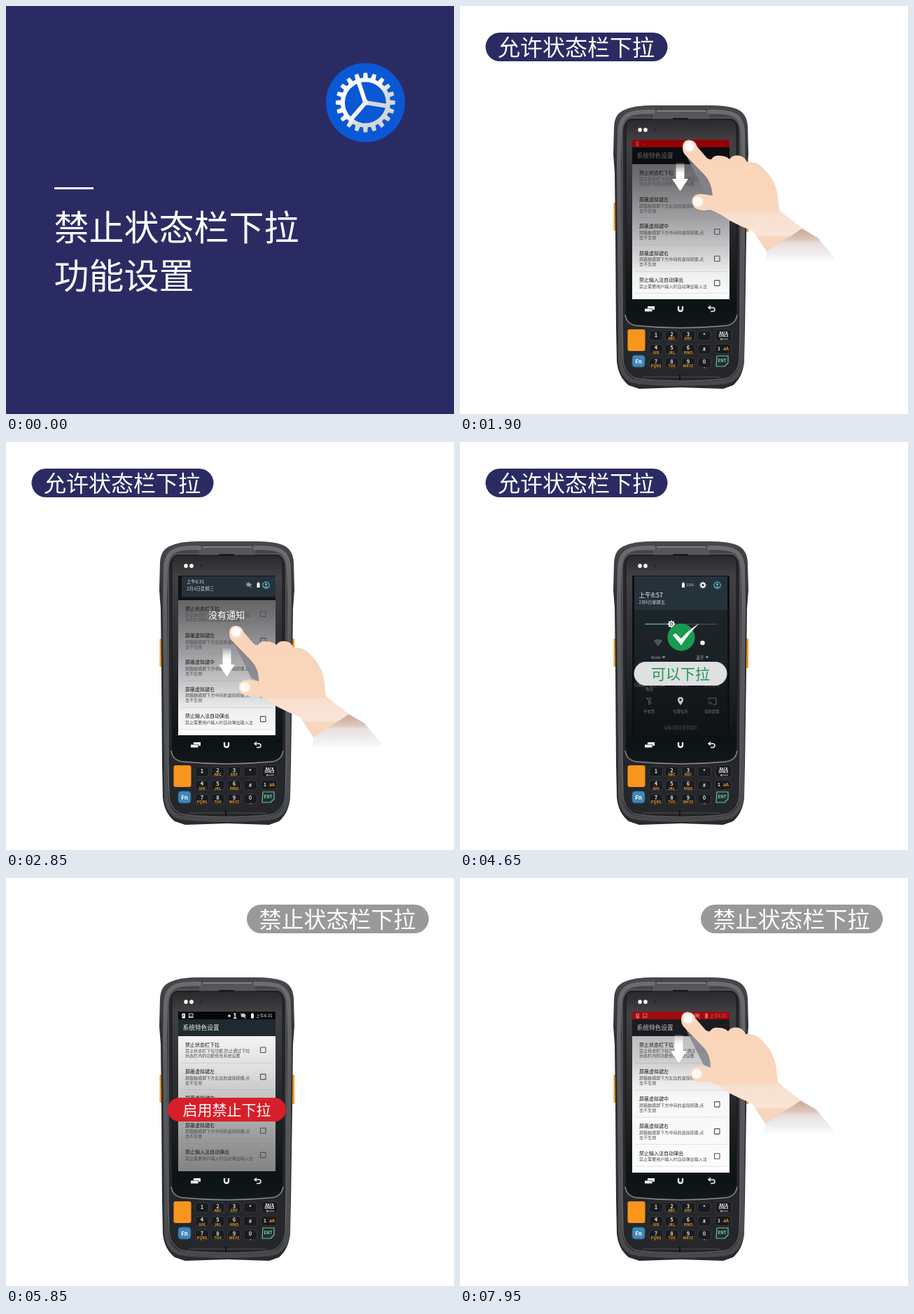
Write an HTML page that moves like this. It is 640x583 px and loops after 8 s.

```html
<!DOCTYPE html>
<html lang="zh">
<head>
<meta charset="utf-8">
<style>
html, body { margin: 0; width: 100%; height: 100%; overflow: hidden; background: #fff; }
svg { display: block; width: 100vw; height: 100vh; }
text { font-family: 'Noto Sans CJK SC', 'Noto Sans CJK', 'Noto Sans', sans-serif; }
</style>
</head>
<body>
<svg id="stage" viewBox="0 0 640 583"></svg>
<script>
const NAVY = '#2b2b64';

// Building blocks; text is placed by its vertical centre.
const rect = (x, y, w, h, fill, r = 0, more = '') =>
  `<rect x="${x}" y="${y}" width="${w}" height="${h}" rx="${r}" fill="${fill}" ${more}/>`;
const circle = (x, y, r, fill, more = '') =>
  `<circle cx="${x}" cy="${y}" r="${r}" fill="${fill}" ${more}/>`;
const path = (d, fill, more = '') => `<path d="${d}" fill="${fill}" ${more}/>`;
const line = (d, color, width, more = '') =>
  path(d, 'none', `stroke="${color}" stroke-width="${width}" ${more}`);
const text = (x, y, size, str, fill, weight = 400, anchor = 'start') =>
  `<text x="${x}" y="${y + size * 0.38}" font-size="${size}" fill="${fill}" font-weight="${weight}" text-anchor="${anchor}">${str}</text>`;
const group = (id, body) => `<g id="${id}">${body}</g>`;
const gradient = (id, stops, dir = 'x2="0" y2="1"') =>
  `<linearGradient id="${id}" x1="0" y1="0" ${dir}>` +
  stops.map(([o, c, a = 1]) => `<stop offset="${o}" stop-color="${c}" stop-opacity="${a}"/>`).join('') +
  '</linearGradient>';

const defs = '<defs>' +
  gradient('gearFill', [[0, '#fff'], [0.45, '#fafafa'], [0.6, '#d9dade'], [1, '#d0d1d6']], 'x2="1" y2="1"') +
  gradient('shell', [[0, '#48494d'], [0.2, '#303135'], [1, '#2a2b2f']]) +
  gradient('rim', [[0, '#6c6d71'], [0.3, '#5c5d61'], [0.75, '#505155'], [1, '#48494d']]) +
  gradient('glass', [[0, '#29292c'], [0.1, '#414144'], [0.35, '#333336'], [0.7, '#1b1e21'], [0.9, '#0c1315'], [1, '#12181a']]) +
  gradient('dimTop', [[0, '#656467'], [0.12, '#747376'], [0.4, '#a09fa1'], [0.62, '#c8c7c9'], [0.82, '#f0f0f0'], [1, '#fbfbfb']]) +
  gradient('dimBottom', [[0, '#f3f3f3'], [0.25, '#dededf'], [0.5, '#bcbcbd'], [0.75, '#9b9b9c'], [1, '#838384']]) +
  gradient('dimFirst', [[0, '#bdbdbf'], [0.2, '#d0d0d1'], [0.28, '#e3e3e4'], [0.45, '#f7f7f7'], [1, '#fcfcfc']]) +
  gradient('quickFill', [[0, '#1f272a'], [0.5, '#1b2225'], [0.7, '#14191b'], [1, '#0f1315']]) +
  gradient('cuff', [[0, '#c9a594'], [0.35, '#dcc6bc'], [0.45, '#e8dedb'], [0.75, '#ededee'], [1, '#f8f8f8', 0.7]]) +
  gradient('skin', [[0, '#f9d4b8'], [0.64, '#f9d6bc'], [0.66, '#f8e0d0'], [0.85, '#f9e4d7'], [0.87, '#f7d5bb'], [1, '#f6d6bf']]) +
  gradient('arrow', [[0, '#fff', 0.15], [0.35, '#fff', 0.75], [0.6, '#fff'], [1, '#fff']]) +
  '</defs>';

function gear(cx, cy, teeth, root, tip, hole, fill) {
  const at = (r, a) => `${(cx + r * Math.cos(a)).toFixed(2)},${(cy + r * Math.sin(a)).toFixed(2)}`;
  const step = 2 * Math.PI / teeth;
  const points = [];
  for (let i = 0; i < teeth; i++) {
    const a = i * step - Math.PI / 2;
    points.push(at(root, a - step * 0.31), at(tip, a - step * 0.2), at(tip, a + step * 0.2), at(root, a + step * 0.31));
  }
  const inner = `M${cx - hole},${cy}a${hole},${hole} 0 1 0 ${2 * hole},0a${hole},${hole} 0 1 0 ${-2 * hole},0`;
  return path(`M${points.join('L')}Z${inner}Z`, fill, 'fill-rule="evenodd"');
}

const title = rect(0, 0, 640, 583, NAVY) +
  circle(513.5, 138, 56.5, '#0a58d5') +
  gear(513.5, 138, 20, 35.5, 42.5, 29.5, 'url(#gearFill)') +
  line('M513.5 138L503.5 108', '#fff', 6) +
  line('M513.5 138L545 143', '#d6d7dc', 6) +
  line('M513.5 138L491 164', '#f4f4f6', 6) +
  circle(513.5, 138, 4, '#eeeef1') +
  rect(69, 259, 56, 3, '#fff') +
  text(68.5, 316, 50, '禁止状态栏下拉', '#fff', 500) +
  text(68.5, 385, 50, '功能设置', '#fff', 500);

const label = (x, str, fill) =>
  rect(x, 38, 260, 41, fill, 20.5) + text(x + 17.5, 59, 32, str, '#fff');

function keypad() {
  const cols = [280, 302.5, 326, 349], rows = [471, 490.5, 510];
  const letters = [['1', ''], ['2', 'ABC'], ['3', 'DEF'], ['*', ''], ['4', 'GHI'], ['5', 'JKL'], ['6', 'MNO'],
    ['#', ''], ['7', 'PQRS'], ['8', 'TUV'], ['9', 'WXYZ'], ['0', '⎵']];
  const key = (x, y, w, h) => rect(x, y, w, h, '#1a1b1e', 4, 'stroke="#3a3b3f" stroke-width="1"');
  let out = '';
  letters.forEach(([digit, sub], i) => {
    const x = cols[i % 4], y = rows[i >> 2];
    out += key(x - 9.5, y - 7, 19, 14) +
      text(x, y - (sub ? 2 : 0.5), 7.5, digit, '#e0e0e0', 700, 'middle') +
      text(x, y + 4.3, 5.4, sub, '#e79a28', 700, 'middle');
  });
  return out +
    rect(239.5, 462, 25, 31, '#f8951d', 3) +
    rect(246, 499, 18, 17, '#4088b9', 4, 'stroke="#28597c" stroke-width="1"') +
    text(255, 507.5, 8, 'Fn', '#fff', 700, 'middle') +
    key(365, 462, 23, 17) +
    text(376.5, 467, 4.6, 'BACK', '#fff', 700, 'middle') +
    text(376.5, 471.5, 4.6, 'SPACE', '#fff', 700, 'middle') +
    line('M372 476H383M374 474.5L372 476L374 477.5', '#ddd', 0.8) +
    key(364, 483, 23, 14) + text(368, 490, 6.5, '1', '#eee', 700) +
    text(376, 490, 6.5, 'aA', '#e79a28', 700) +
    path('M367 500H383V510L378 515H366Z', '#1c3230', 'stroke="#79b8a3" stroke-width="1.2" stroke-linejoin="round"') +
    text(374.5, 507, 6, 'ENT', '#8fd0b4', 700, 'middle');
}

const phone =
  rect(219.5, 281, 4, 40, '#f0a02c', 1) + rect(407, 281, 5, 42, '#f39a1c', 1) +
  // rubber shell
  path('M236 148Q250 142 276 142H357Q382 142 395 147Q410 153 411 172L412 212L410 238L409 330L407 460L406 508Q404 530 390 542L376 547L316 545L256 547L241 542Q226 530 224 508L223 460L222 330L221 238L219 212L220 172Q221 153 236 148Z', 'url(#shell)') +
  // metal frame
  line('M242 155Q250 151 276 151L282 158H350L356 151Q382 151 390 155Q403 160 404 180L405 225L403 460V506Q401 527 386 535Q375 539 316 540Q256 539 245 535Q230 527 229 506V460L227 225L228 180Q229 160 242 155Z', 'url(#rim)', 6) +
  path('M243 160H389Q400 165 400 180V460L399 506Q398 522 384 531Q372 535 316 536Q260 535 248 531Q234 522 233 506L232 460V180Q232 165 243 160Z', '#26272a', 'stroke="#797a7e" stroke-width=".9"') +
  path('M282 149H350L356 155V162H276V155Z', '#55565a') + line('M281 150H351', '#8b8c90', 1.3) +
  rect(304, 160, 22, 3, '#17181a', 1) +
  path('M248 162H384Q395 162 395 174V440Q394 453 378 455Q316 461 253 455Q237 453 237 440V174Q237 162 248 162Z', 'url(#glass)', 'stroke="#18191b"') +
  line('M236 441Q238 456 254 457Q316 463 378 457Q394 456 396 441', '#85868b', 1.5) +
  circle(257, 177, 2.9, '#f4f4f4') + circle(265, 177, 2.9, '#f4f4f4') + rect(277, 175, 4, 4, '#22235d') +
  path('M268 429H278V434H275V432H268Z', '#f2f2f2') + rect(264, 432.5, 10.5, 4, '#f2f2f2') +
  line('M312 429V433Q312 436 315 436Q318 436 318 433V429', '#f2f2f2', 2.3) +
  line('M356 431H361Q364 431 364 433.8Q364 436.5 361 436.5H358M358 428.5L355 431L358 433.5', '#f2f2f2', 1.5) +
  keypad() + line('M256 541L262 530H312L314 532L316 530H370L376 541', '#4e4f53', 1) + rect(313, 527, 2, 7, '#0e0e10');

const entries = [
  ['禁止状态栏下拉', '禁止状态栏下拉功能,防止通过下拉', '状态栏内的功能修改系统设置'],
  ['屏蔽虚拟键左', '屏蔽触摸屏下方左边的虚拟按键,点', '击不生效'],
  ['屏蔽虚拟键中', '屏蔽触摸屏下方中间的虚拟按键,点', '击不生效'],
  ['屏蔽虚拟键右', '屏蔽触摸屏下方中间的虚拟按键,点', '击不生效'],
  ['禁止输入法自动弹出', '禁止需要用户输入时自动弹出输入法', '']
];

function settings({ bar, head, headText, list, pitch = 38.4, bottom = 419, checked }) {
  let out = rect(246, 191, 139, 11.5, bar) + rect(246, 202, 139, 24, head) +
    text(252.5, 214, 8.7, '系统特色设置', headText) + rect(246, 226, 139, bottom - 226, list);
  entries.forEach(([name, first, second], i) => {
    const y = 238 + i * pitch, box = y + (i === 4 ? 4 : 7.5);
    out += text(256, y, 7, name, '#151515', 500) +
      text(256, y + 9, 6.05, first, '#4c4c4e') + text(256, y + 16, 6.05, second, '#4c4c4e') +
      rect(363.5, box - 3.5, 7.5, 7.5, 'none', 0.5, 'stroke="#4f4f51" stroke-width="1.1"') +
      rect(250, y + (i === 4 ? 18.5 : 26), 131, 0.6, '#777', 0, 'opacity=".3"');
    if (checked && !i) out += line(`M365 ${box}l2 2l4 -5`, '#00897b', 1.3);
  });
  return out;
}

const battery = (x, y, fill) => rect(x - 2, y - 3, 4, 6.5, fill, 0.5) + rect(x - 1, y - 4, 2, 1.2, fill);
const muted = (x, y, fill) =>
  path(`M${x - 3} ${y + 2}Q${x - 3} ${y - 4} ${x} ${y - 4}Q${x + 3} ${y - 4} ${x + 3} ${y + 2}Z`, fill, 'opacity=".7"') +
  line(`M${x - 4} ${y - 4}L${x + 4} ${y + 4}M${x - 4} ${y - 1}H${x + 4}`, fill, 0.9);
const person = (x, y) => circle(x, y, 4.6, 'none', 'stroke="#63b6c6" stroke-width="1.3"') +
  circle(x, y - 1.3, 1.6, '#63b6c6') + path(`M${x - 3} ${y + 3}Q${x} ${y - 0.5} ${x + 3} ${y + 3}Z`, '#63b6c6');

const statusIcons = color =>
  rect(251.5, 193.5, 4.5, 7, color, 0.7) + line('M253.8 195V198', '#222', 0.9) +
  rect(261.5, 194, 5.5, 5.5, 'none', 0, `stroke="${color}" stroke-width=".9"`) + line('M262 199L264 197L266.5 199', color, 1) +
  circle(319, 197, 1.8, color) + text(327, 197, 10.5, '1', color, 700, 'middle') +
  muted(339, 197, color) + battery(352, 197, color) + text(357, 197, 6, '上午6:31', color);

const redDim = settings({ bar: '#920208', head: '#0c0d10', headText: '#69696b', list: 'url(#dimTop)' }) +
  rect(252, 194, 2.5, 6, 'none', 0, 'stroke="#d16a6a" stroke-width=".8"') +
  circle(263, 198, 0.7, '#c55') + line('M326.5 194H328.5V200H326.5', '#c86464', 0.8);

const shade = rect(246, 191, 139, 35, '#101315') + rect(251, 192, 134, 29.5, '#26323a') +
  text(258, 200, 6.4, '上午6:31', '#e6e9ea') + text(258, 209.5, 6.4, '2月4日星期三', '#ccd2d4') +
  muted(347, 204.5, '#a7afb2') + battery(360.5, 204.5, '#fff') + person(371.5, 204.5) +
  text(315, 247, 13, '没有通知', '#fff', 500, 'middle');

const tile = (x, str) => text(x, 385, 5.3, str, '#6c7376', 400, 'middle');
const caret = x => path(`M${x} 306.5h5l-2.5 2.8z`, '#a7adaf');
const quick = rect(246, 191, 139, 231, '#0b1012') + rect(249, 192, 133, 228, 'url(#quickFill)') + rect(249, 192, 133, 48, '#26323a') +
  battery(319, 204.5, '#fff') + text(323.5, 204.5, 5.2, '11%', '#e5e8e9') +
  gear(347, 204.5, 8, 3.5, 4.7, 1.7, '#fff') + person(367.5, 204.5) +
  text(255.5, 218.5, 8.7, '上午8:57', '#f0f2f2') + text(255.5, 229, 6.1, '2月6日星期五', '#d5dadb') +
  rect(264, 259.5, 38, 1.4, '#58aea4') + rect(302, 259.8, 65, 0.9, '#586064') +
  gear(302, 260.2, 8, 4, 5.3, 2.4, '#fff') + circle(302, 260.2, 1.4, '#fff') +
  path('M276.5 284Q283 279.5 289.5 284L283 292Z', '#4f5659') + circle(346.5, 287, 3.3, '#eef0f0') +
  text(273, 308, 5, 'WLAN', '#a7adaf') + caret(288.5) + text(337.5, 308, 5.4, '蓝牙', '#a7adaf') + caret(350.5) +
  rect(254, 314, 123, 0.6, '#384246') +
  text(270.5, 347, 5.5, '只能拨打紧急呼救', '#757b7d', 400, 'middle') + text(270.5, 353, 5.5, '电话', '#757b7d', 400, 'middle') +
  text(315, 347, 5.5, '飞行模式', '#555c5f', 400, 'middle') + text(360, 347, 5.5, '自动旋转', '#555c5f', 400, 'middle') +
  line('M267.5 366H273.5L271.5 369V375H269.5V369ZM265.5 365L274.5 374', '#5d6467', 0.9) +
  path('M315 376Q311 371 311 368.5A4 4 0 0 1 319 368.5Q319 371 315 376ZM315 367a1.5 1.5 0 1 0 .01 0Z', '#c3c8ca', 'fill-rule="evenodd"') +
  line('M355 368V366H366V375H361M355 370.5Q359 371 359.5 375M355 373Q357 373.5 357.2 375', '#5d6467', 1) +
  tile(270, '手电筒') + tile(315, '位置信息') + tile(360, '投射屏幕') +
  text(315, 408, 5.3, '设备可能会受到监控', '#4c5457', 400, 'middle');

const pill = (x, w, str, fill, color, weight) =>
  rect(x, 314, w, 34, fill, 17) + text(x + w / 2, 331, 21, str, color, weight, 'middle');
const allowed = circle(316, 279, 19.5, '#189b50') +
  path('M304 276L308 273.5L316 281Q327 268 342 259Q328 272 316 290.5Z', '#fff') +
  pill(248.5, 133, '可以下拉', '#dfe0e1', '#219653', 400);

const arrow = rect(309.5, 295, 12, 26, 'url(#arrow)') + path('M304 318H327L315.5 335.5Z', '#fff');
const hand =
  path('M321 278L351 338L361 342L359 314Z', '#86838a', 'opacity=".85"') +
  path('M437 436L440 420L488 388L512 402L538 433L528 436Z', 'url(#cuff)') +
  path('M319 273C319 264 326 260 333 264L351 285Q355 291 360 290Q364 284 372 285Q381 285 386 290Q391 283 401 285Q408 287 411 294Q425 292 435 304Q453 321 455 345L457 363L490 389L439 422L420 393Q402 386 387 378Q372 367 358 362Q346 365 337 360Q331 354 333 346Q337 338 349 340L362 342Q360 322 350 312L322 283Q319 279 319 273Z', 'url(#skin)') +
  circle(330, 272, 9, '#f5ddcd') + circle(328.5, 271.5, 7, '#fffaf6') +
  circle(342, 350.5, 9, '#f5dccb') + circle(341, 350.5, 7, '#fff8f3');

const calm = { head: '#1f2a2e', headText: '#f1f1f1', bar: '#050708' };
document.getElementById('stage').innerHTML = defs +
  group('device',
    phone +
    group('redDim', redDim) +
    group('shade', shade) +
    group('quick', quick) +
    group('fading', settings({ ...calm, list: 'url(#dimBottom)' }) + statusIcons('#f2f2f2')) +
    group('ticked', settings({ ...calm, list: '#fafafa', pitch: 38.8, bottom: 421, checked: true }) + statusIcons('#f2f2f2')) +
    group('blocked', settings({ bar: '#a00a10', head: '#1b1c1f', headText: '#c4c4c5', list: 'url(#dimFirst)', pitch: 38.8, bottom: 421 }) + statusIcons('#d86a66')) +
    group('allowed', allowed) +
    group('enable', pill(231, 169, '启用禁止下拉', '#d71f29', '#fff', 500)) +
    group('allowLabel', label(36.5, '允许状态栏下拉', NAVY)) +
    group('denyLabel', label(344, '禁止状态栏下拉', '#999')) +
    group('hand', group('arrow', arrow) + hand)) +
  group('title', title);

// Each scene: start time, visible parts, hand offset.
const scenes = [
  [0, 'title'],
  [950, 'device redDim allowLabel'],
  [1900, 'device redDim allowLabel hand arrow', [-1, -71]],
  [2850, 'device redDim shade allowLabel hand arrow', [0, 0]],
  [3750, 'device quick allowLabel hand arrow', [0, 73]],
  [4650, 'device quick allowed allowLabel'],
  [5850, 'device fading enable denyLabel'],
  [6950, 'device ticked denyLabel hand', [38, -8]],
  [7950, 'device blocked denyLabel hand arrow', [-3, -71]]
];
const LOOP = 8000;
const parts = [...document.querySelectorAll('#stage g[id]')];

function render(time) {
  const [, visible, offset = [0, 0]] = scenes.filter(scene => scene[0] <= time).pop();
  const names = visible.split(' ');
  for (const part of parts) part.style.display = names.includes(part.id) ? '' : 'none';
  document.getElementById('hand').setAttribute('transform', `translate(${offset})`);
}

const start = performance.now();
function tick() {
  render((performance.now() - start) % LOOP);
  requestAnimationFrame(tick);
}
tick();
</script>
</body>
</html>
```
